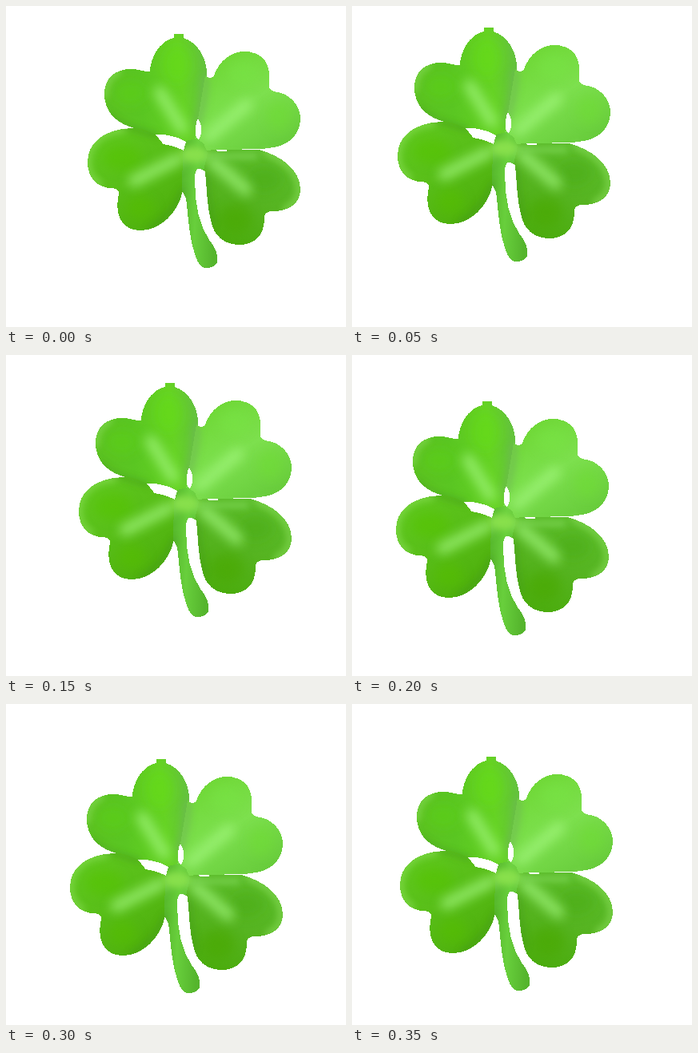
Recreate the animation shown at these times as an HTML page. Size 425 by 402 pixels, loop 400 ms.

```html
<!DOCTYPE html>
<html lang="en">
<head>
<meta charset="utf-8">
<title>Shaking clover</title>
<style>
  html, body { margin: 0; width: 100%; height: 100%; overflow: hidden; background: #fff; }
  svg { display: block; width: 425px; height: 402px; }
  .leaf, .gap { shape-rendering: crispEdges; }
  .soft { fill: none; stroke-linecap: round; stroke-linejoin: round; }
</style>
</head>
<body>
<svg viewBox="0 0 425 402">
  <defs>
    <path id="topLeft" d="M210 35H222V40C240 46 252 66 251 88C250 110 243 130 240 141C236 150 237 160 238 168L225 170C212 162 198 161 187 161C175 158 163 154 154 151C135 144 123 130 123 110C123 91 136 79 156 79C166 79 176 83 180 82C180 66 192 43 210 40Z"/>
    <path id="topRight" d="M249 87C253 91 258 91 260 87C266 70 280 57 298 57C316 57 329 68 329 86V103C332 108 338 107 344 109C359 114 368 128 368 141C368 162 352 174 335 177C322 180 300 179 276 180L246 184L236 168L240 141Z"/>
    <path id="lowRight" d="M236 181L276 180H316C343 187 368 205 368 230C368 248 352 257 334 257C326 257 322 260 323 266C323 288 310 299 292 299C272 299 259 287 256 268C251 250 251 225 249 208C246 203 242 202 238 203L230 190Z"/>
    <path id="lowLeft" d="M224 181C212 178 205 172 196 172L187 161C176 156 168 152 156 153C122 155 102 171 102 196C102 216 116 229 134 228C141 229 143 234 140 240C136 266 148 281 168 281C192 281 215 260 221 231C223 218 226 205 236 195Z"/>
    <path id="stem" d="M221 182L225 169L238 166L247 172L252 184L247 206C237 199 236 208 236 218C236 250 242 275 254 293C262 303 265 310 264 321C261 327 253 329 248 328C238 324 236 310 232 296C228 276 227 255 225 241L220 231Z"/>
    <clipPath id="clover">
      <use href="#topLeft"/><use href="#topRight"/><use href="#lowRight"/><use href="#lowLeft"/><use href="#stem"/>
    </clipPath>
    <linearGradient id="gTopLeft" x1="0" y1=".5" x2="1" y2=".4">
      <stop stop-color="#5cc222"/><stop offset=".35" stop-color="#5ac622"/><stop offset=".75" stop-color="#66d324"/><stop offset="1" stop-color="#64c23e"/>
    </linearGradient>
    <linearGradient id="gTopRight" x1=".2" y1="0" x2=".8" y2="1">
      <stop stop-color="#6dd733"/><stop offset=".5" stop-color="#7de04e"/><stop offset="1" stop-color="#66ca3a"/>
    </linearGradient>
    <linearGradient id="gLowRight" x1=".8" y1="0" x2=".3" y2="1">
      <stop stop-color="#5bbd2b"/><stop offset=".5" stop-color="#56b421"/><stop offset="1" stop-color="#4bac0c"/>
    </linearGradient>
    <linearGradient id="gLowLeft" x1="0" y1=".2" x2=".7" y2="1">
      <stop stop-color="#5fc81e"/><stop offset=".5" stop-color="#58bd18"/><stop offset="1" stop-color="#4dae0b"/>
    </linearGradient>
    <linearGradient id="gStem" x2="1" y2=".15">
      <stop stop-color="#55b52b"/><stop offset=".45" stop-color="#68cf3c"/><stop offset="1" stop-color="#55b52d"/>
    </linearGradient>
    <filter id="blur" filterUnits="userSpaceOnUse" x="60" y="0" width="350" height="360"><feGaussianBlur stdDeviation="7"/></filter>
    <filter id="haze" filterUnits="userSpaceOnUse" x="60" y="0" width="350" height="360"><feGaussianBlur stdDeviation="4"/></filter>
  </defs>

  <g id="body">
    <g class="leaf">
      <use href="#topLeft" fill="url(#gTopLeft)"/>
      <use href="#topRight" fill="url(#gTopRight)"/>
      <use href="#lowRight" fill="url(#gLowRight)"/>
      <use href="#lowLeft" fill="url(#gLowLeft)"/>
      <use href="#stem" fill="url(#gStem)"/>
    </g>
    <g clip-path="url(#clover)">
      <!-- rounded lobes -->
      <g filter="url(#blur)" opacity=".6">
        <ellipse cx="214" cy="73" rx="18" ry="24" fill="#65dc15"/>
        <ellipse cx="156" cy="109" rx="20" ry="15" fill="#5bcf16"/>
        <ellipse cx="297" cy="84" rx="20" ry="16" fill="#78e344"/>
        <ellipse cx="341" cy="138" rx="16" ry="18" fill="#70dc35"/>
        <ellipse cx="145" cy="190" rx="24" ry="16" fill="#55c305"/>
        <ellipse cx="168" cy="253" rx="18" ry="16" fill="#55bd04"/>
        <ellipse cx="323" cy="217" rx="22" ry="16" fill="#4cac14"/>
        <ellipse cx="288" cy="266" rx="20" ry="18" fill="#48a804"/>
      </g>
      <!-- light and shaded rims -->
      <g class="soft" filter="url(#haze)" opacity=".6">
        <path stroke="#8cdf5c" stroke-width="9" d="M140 82Q123 92 123 112M145 155C118 157 102 174 102 196Q102 214 116 223M325 183Q366 200 367 230Q365 248 350 254"/>
        <path stroke="#6fb854" stroke-width="11" d="M249 92Q248 120 239 146"/>
        <path stroke="#449a1d" stroke-width="6" d="M156 153Q172 158 188 162M221 231Q207 265 180 279M250 212Q253 250 258 272M128 136Q140 147 154 152"/>
      </g>
      <!-- pale creases -->
      <g class="soft" filter="url(#blur)" stroke="#a0f57c" stroke-width="15" opacity=".75">
        <path d="M192 108L220 153M253 164L301 124M160 219L216 191M258 194L300 230"/>
      </g>
      <path class="soft" filter="url(#haze)" d="M240 188H312" stroke="#7cd653" stroke-width="6"/>
      <ellipse cx="235" cy="186" rx="17" ry="10" fill="#88e04c" filter="url(#haze)"/>
    </g>
    <path class="gap" fill="#fff" d="M187 161Q207 160 225 170L222 181Q211 175 196 173L194 167ZM240 141Q245 148 244 158Q243 166 240 167Q236 164 237 155Q237 146 240 141ZM262 180H276V182H264Z"/>
  </g>
</svg>
<script>
  const STEP = 50;
  const shake = [[0, 0], [-45, -8], [-28, -9], [-11, 0], [-47, 23], [-50, 41], [-22, 34], [-42, 31]];
  const clover = document.getElementById("body");

  function draw(now) {
    const [x, y] = shake[Math.floor(now / STEP) % shake.length];
    clover.setAttribute("transform", `translate(${x} ${y})`);
  }

  const start = performance.now();
  function tick() {
    draw(performance.now() - start);
    requestAnimationFrame(tick);
  }
  tick();
</script>
</body>
</html>
```
